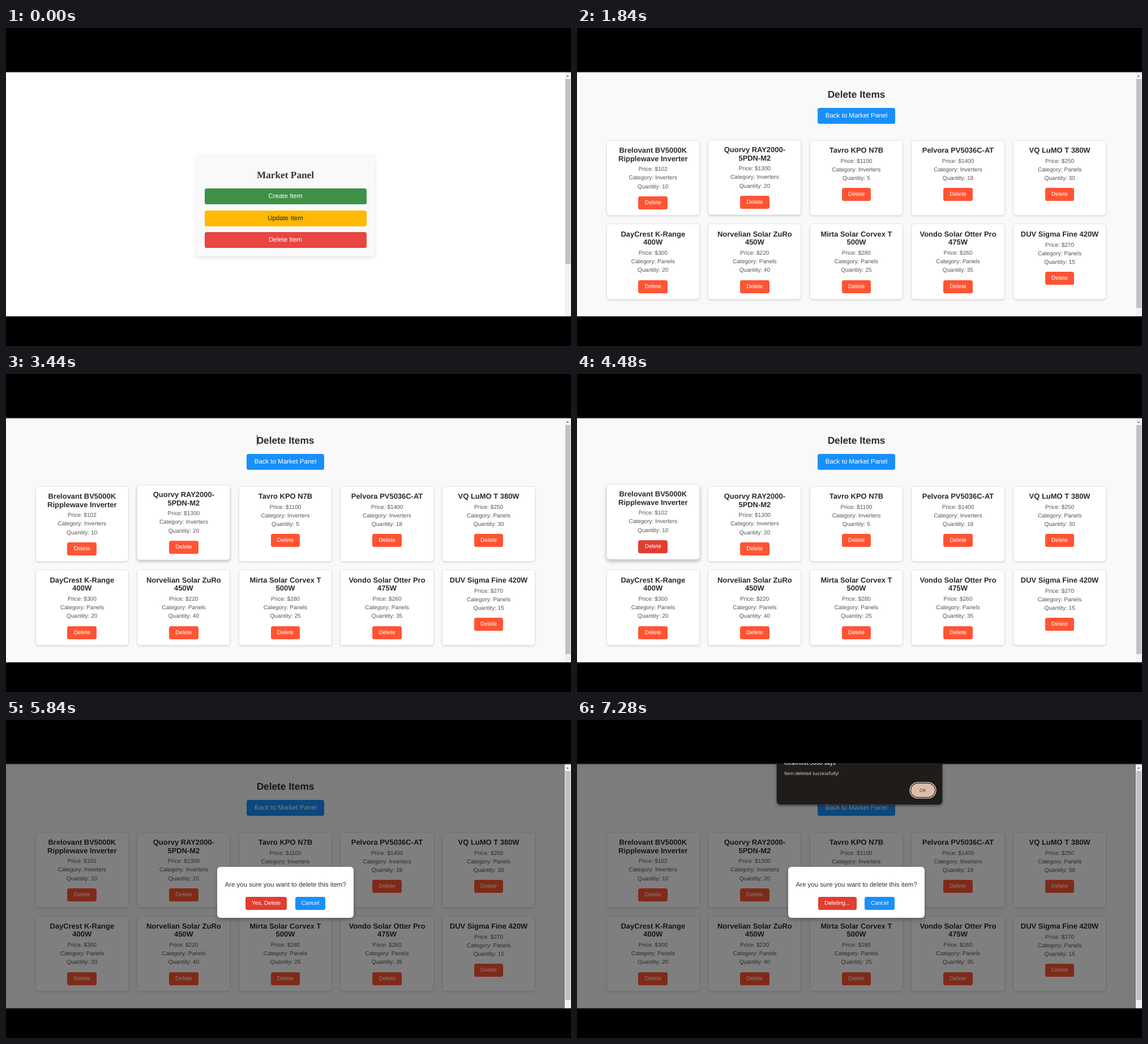
Animation, 998 px wide and 561 px high, one loop 8000 ms. Source, as an HTML page:

```html
<!DOCTYPE html>
<html lang="en">
<head>
<meta charset="utf-8">
<title>Market Panel</title>
<style>
  html, body { margin: 0; width: 100%; height: 100%; overflow: hidden; background: #000; }
  body {
    position: relative;
    font: 11.52px/14px "Liberation Sans", Arial, sans-serif;
    text-rendering: geometricPrecision;
    white-space: nowrap;
    --low: 0 1.5px 3px rgba(0, 0, 0, .12);
    --high: 0 3.5px 6px rgba(0, 0, 0, .25);
    --red: #ff5433;
    --dark-red: #e03e2f;
    --blue: #188ffa;
  }
  div, h1, h2, h3, p { box-sizing: border-box; margin: 0; }
  .stage { position: absolute; left: 0; top: 0; width: 998px; height: 561px; overflow: hidden; }
  .edge { position: absolute; left: 0; top: 77px; width: 998px; height: 432px; border: solid; border-width: 1px 0; border-color: #3c3e3d transparent rgba(0, 0, 0, .4); box-shadow: inset 0 1px rgba(0, 0, 0, .2); }
  .scene { position: absolute; left: 0; top: 78px; width: 998px; height: 431px; overflow: hidden; background: #fff; animation: 8s step-end infinite; }
  .center { position: absolute; left: 0; width: 987px; text-align: center; }
  .btn { border-radius: 3.6px; color: #fff; text-align: center; }
  .caret { position: absolute; width: 1px; background: #444; }

  .bar { position: absolute; right: 0; top: 0; width: 11px; height: 431px; background: #f1f1f1; }
  .bar::before { content: ""; position: absolute; left: 3px; top: 5px; border: 2.5px solid transparent; border-top: 0; border-bottom: 3px solid #6a6a6a; }
  .bar::after { content: ""; position: absolute; left: 1px; top: 12px; width: 9px; height: var(--thumb); background: #c1c1c1; }

  /* Panel */
  .panel { animation-name: panel; }
  .box { position: absolute; left: 335.5px; top: 143.5px; width: 316px; height: 181.5px; border-radius: 7.2px; background: #f9f9f9; box-shadow: 0 3px 7.2px rgba(0, 0, 0, .1); }
  .box h1 { position: absolute; top: 27px; width: 100%; text-align: center; font: bold 17.28px/22px "Liberation Serif", "Times New Roman", serif; color: #333; }
  .box .btn { position: absolute; left: 15px; width: 286px; height: 28px; line-height: 28px; animation: 8s ease infinite; }
  .create { top: 61.3px; background: #3d9247; }
  .box .update { top: 100.1px; background: #ffb902; color: #222; animation-name: update; }
  .box .delete { top: 138.7px; background: #e94643; animation-name: remove; }

  /* Loading */
  .loading { animation-name: loading; font: 11.52px/14px "Liberation Serif", "Times New Roman", serif; color: #000; }

  /* Items */
  .items { animation-name: items; background: #f9f9f9; }
  .items h2 { top: 28px; font-size: 17.28px; line-height: 22px; color: #2a2a2a; }
  .items .caret { left: 443px; top: 29px; height: 19px; animation: blink 8s step-end infinite; }
  .back { position: absolute; left: 424.6px; top: 62.6px; width: 137.8px; height: 28.2px; line-height: 28.2px; background: var(--blue); }
  .grid { position: absolute; left: 51.7px; top: 119.6px; display: grid; grid-template-columns: repeat(5, 165.2px); grid-auto-rows: 133.4px; gap: 14.4px; }
  .card { padding-top: 11.5px; border-radius: 5.8px; background: #fff; text-align: center; color: #555; font-size: 10.08px; line-height: 15.1px; box-shadow: inset 0 0 0 .8px #ddd, var(--low); animation: 8s ease infinite; }
  .card h3 { margin-bottom: 4.3px; font-size: 12.96px; line-height: 14.5px; color: #2a2a2a; }
  .card .btn { width: 51.7px; height: 23px; margin: 9.3px auto 0; line-height: 23px; background: var(--red); }
  .card:nth-child(1) { animation-name: first; }
  .card:nth-child(2) { animation-name: second; }
  .card:nth-child(3) { animation-name: third; }
  .card:nth-child(1) .btn { animation: press 8s ease infinite; }

  /* Confirmation */
  .confirm { width: 987px; background: rgba(0, 0, 0, .5); animation-name: confirm; }
  .modal { position: absolute; left: 372.8px; top: 180.8px; width: 241.6px; height: 90.7px; border-radius: 5.8px; background: #fff; box-shadow: 0 3px 7px rgba(0, 0, 0, .3); text-align: center; color: #333; }
  .modal p { padding-top: 25.2px; }
  .row { position: absolute; left: 0; top: 53.4px; width: 100%; display: flex; justify-content: center; gap: 14.2px; font-size: 10.08px; line-height: 23px; animation: 8s step-end infinite; }
  .row .btn { padding: 0 11.2px; background: var(--blue); }
  .ask { animation-name: ask; }
  .busy { animation-name: busy; }
  .ask .btn:first-child { animation: hover 8s ease infinite; }
  .busy .btn:first-child { background: var(--dark-red); }

  /* Browser alert */
  .clip { position: absolute; left: 0; top: 76px; width: 998px; height: 100px; overflow: hidden; }
  .alert { position: absolute; left: 353px; top: -20px; width: 291.5px; height: 93px; border-radius: 6px; background: #1f1c1a; box-shadow: 0 0 0 .7px #4a4644, 0 2px 5px rgba(0, 0, 0, .45); font: 8.1px/12px "Open Sans", "Noto Sans", sans-serif; color: #eae5e2; animation: alert 8s linear infinite; }
  .alert b { position: absolute; left: 13px; top: 13px; font-size: 9.8px; line-height: 14px; font-weight: 600; }
  .alert p { position: absolute; left: 13px; top: 33px; }
  .ok { position: absolute; left: 237px; top: 55.5px; width: 41.5px; height: 24.5px; border-radius: 13px; text-align: center; line-height: 25px; color: #3c2a22; background: #dcbcaa; box-shadow: 0 0 0 1.2px #1f1c1a, 0 0 0 2.6px #ecd5c8; animation: ok 8s ease infinite; }

  @keyframes panel { 0% { opacity: 1 } 12.9%, 100% { opacity: 0 } }
  @keyframes loading { 0% { opacity: 0 } 12.9% { opacity: 1 } 17.9%, 100% { opacity: 0 } }
  @keyframes items { 0% { opacity: 0 } 17.9%, 100% { opacity: 1 } }
  @keyframes confirm { 0% { opacity: 0 } 57.9%, 100% { opacity: 1 } }
  @keyframes ask { 0% { opacity: 1 } 74.9%, 100% { opacity: 0 } }
  @keyframes busy { 0% { opacity: 0 } 74.9%, 100% { opacity: 1 } }
  @keyframes blink {
    0%, 30.75%, 43.25%, 55.75%, 100% { opacity: 0 }
    24.5%, 37%, 49.5% { opacity: 1 }
  }
  @keyframes update { 0%, 1%, 8.5%, 100% { background: #ffb902 } 4.5%, 5% { background: #f7ab00 } }
  @keyframes remove { 0%, 6% { background: #e94643 } 10%, 100% { background: #d93a36 } }
  @keyframes first {
    0%, 47%, 61.75%, 100% { transform: none; box-shadow: inset 0 0 0 .8px #ddd, var(--low) }
    50.75%, 58% { transform: translateY(-3.65px); box-shadow: inset 0 0 0 .8px #ddd, var(--high) }
  }
  @keyframes second {
    0%, 22.3%, 33.75%, 36%, 46.05%, 100% { transform: none; box-shadow: inset 0 0 0 .8px #ddd, var(--low) }
    26.05%, 30%, 39.75%, 42.3% { transform: translateY(-3.65px); box-shadow: inset 0 0 0 .8px #ddd, var(--high) }
  }
  @keyframes third {
    0%, 30%, 39.75%, 100% { transform: none; box-shadow: inset 0 0 0 .8px #ddd, var(--low) }
    33.75%, 36% { transform: translateY(-3.65px); box-shadow: inset 0 0 0 .8px #ddd, var(--high) }
  }
  @keyframes press {
    0%, 52.25%, 61.75%, 100% { background: var(--red) }
    56%, 58% { background: var(--dark-red) }
  }
  @keyframes hover { 0%, 68.75% { background: var(--red) } 72.5%, 100% { background: var(--dark-red) } }
  @keyframes alert { 0%, 76.5% { opacity: 0 } 79%, 100% { opacity: 1 } }
  @keyframes ok { 0%, 86.5% { background: #e4c6b5 } 90.5%, 100% { background: #dcbcaa } }
</style>
</head>
<body>
<div class="stage">
  <div class="scene items">
    <h2 class="center">Delete Items</h2>
    <div class="caret"></div>
    <div class="btn back">Back to Market Panel</div>
    <div class="grid"></div>
    <div class="bar" style="--thumb: 403.5px"></div>
  </div>

  <div class="scene loading">
    Loading...
    <div class="caret" style="left: 0; top: 1px; height: 13px"></div>
  </div>

  <div class="scene panel">
    <div class="box">
      <h1>Market Panel</h1>
      <div class="btn create">Create Item</div>
      <div class="btn update">Update Item</div>
      <div class="btn delete">Delete Item</div>
    </div>
    <div class="bar" style="--thumb: 326px"></div>
  </div>

  <div class="scene confirm">
    <div class="modal">
      <p>Are you sure you want to delete this item?</p>
      <div class="row ask"><div class="btn">Yes, Delete</div><div class="btn">Cancel</div></div>
      <div class="row busy"><div class="btn">Deleting...</div><div class="btn">Cancel</div></div>
    </div>
  </div>

  <div class="edge"></div>

  <div class="clip">
    <div class="alert">
      <b>localhost:5000 says</b>
      <p>Item deleted successfully!</p>
      <div class="ok">OK</div>
    </div>
  </div>
</div>

<script>
  const items = [
    ["Brelovant BV5000K<br>Ripplewave Inverter", 102, "Inverters", 10],
    ["Quorvy RAY2000-<br>5PDN-M2", 1300, "Inverters", 20],
    ["Tavro KPO N7B", 1100, "Inverters", 5],
    ["Pelvora PV5036C-AT", 1400, "Inverters", 18],
    ["VQ LuMO T 380W", 250, "Panels", 30],
    ["DayCrest K-Range<br>400W", 300, "Panels", 20],
    ["Norvelian Solar ZuRo<br>450W", 220, "Panels", 40],
    ["Mirta Solar Corvex T<br>500W", 280, "Panels", 25],
    ["Vondo Solar Otter Pro<br>475W", 260, "Panels", 35],
    ["DUV Sigma Fine 420W", 270, "Panels", 15]
  ];
  document.querySelector(".grid").innerHTML = items.map(([name, price, category, count]) => `
    <div class="card">
      <h3>${name}</h3>
      <p>Price: $${price}</p>
      <p>Category: ${category}</p>
      <p>Quantity: ${count}</p>
      <div class="btn">Delete</div>
    </div>`).join("");
</script>
</body>
</html>
```
